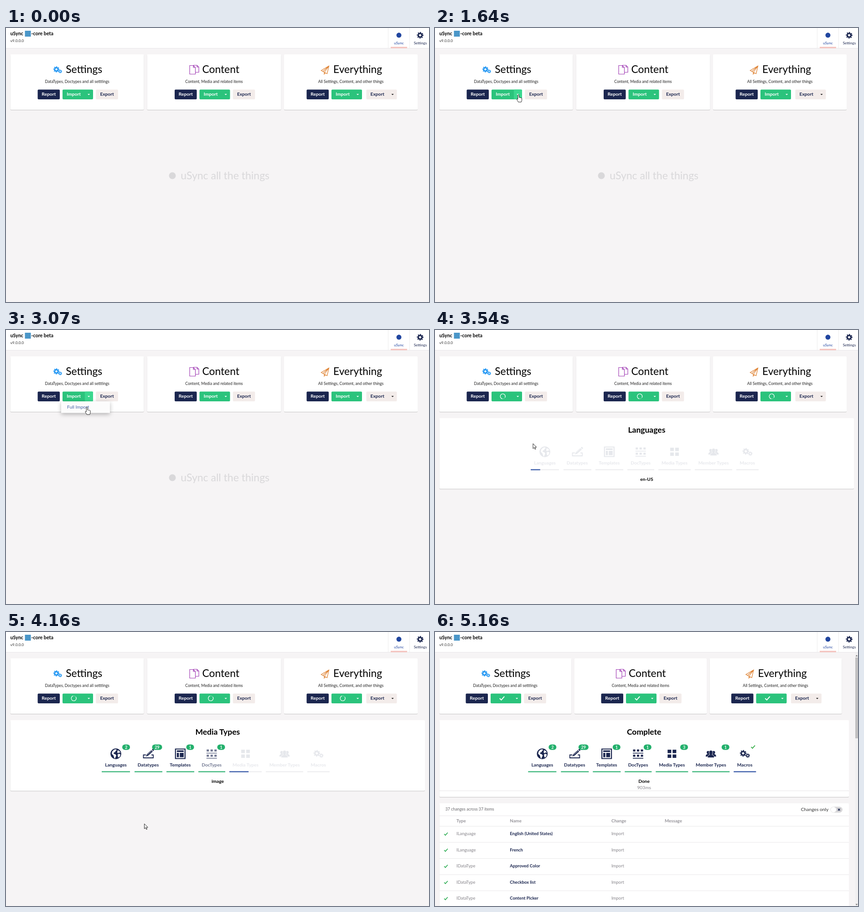
These frames come from a looping animation (928 px wide and 603 px high, 5.8 s). An HTML page:

```html
<!DOCTYPE html>
<html lang="en">
<head>
<meta charset="utf-8">
<title>uSync import</title>
<style>
  html, body { margin: 0; width: 100%; height: 100%; overflow: hidden; background: #f6f4f5; }
  svg { display: block; width: 100vw; height: 100vh; font-family: Lato, "Open Sans", sans-serif; }
  .panel { fill: #fff; filter: drop-shadow(0 1px .6px rgba(0, 0, 0, .2)); }
  .menu { fill: #fcfcfc; filter: drop-shadow(0 3px 5px rgba(0, 0, 0, .28)); }
</style>
</head>
<body>
<svg id="stage" viewBox="0 0 928 603"></svg>
<script>
const LOOP = 5800;
const NAVY = '#1b264f', GREEN = '#2bc37c', LIT = '#3bd78f', DONE = '#23b06c', BLUE = '#2146a0', GREY = '#86848a';
const OPEN = 2670, RUN = 3380, FINISH = 4540;

// Bursts of change: first step, last step, count.
const bursts = [[480, 1020, 8], [1110, 1640, 8], [2050, 2600, 8], [2670, 3200, 8],
  [3380, 3920, 8], [4000, 4540, 8], [4620, 4700, 2], [4860, 5160, 5]];
const steps = [0, ...bursts.flatMap(([a, b, n]) =>
  Array.from({ length: n }, (_, i) => Math.floor((a + (b - a) * i / (n - 1)) / 10) * 10))];

// Pointer path: time, x, y.
const path = [[480, 764, 262], [560, 700, 248], [710, 420, 197], [870, 200, 160], [940, 98, 142],
  [1020, 150, 149], [1110, 175.5, 150], [1330, 181, 150], [1640, 183, 147], [2120, 182.5, 145.5],
  [2670, 182.5, 147], [2900, 180, 164], [3040, 177.5, 170], [3200, 176, 171], [3380, 178, 175],
  [3530, 215, 250], [3760, 294.5, 374.5], [3920, 303.5, 422], [4780, 303.5, 422],
  [4930, 340, 462], [5080, 443, 561]];

const clamp = v => Math.max(0, Math.min(1, v));
const text = (x, y, size, s, fill = '#000', bold, anchor = 'start') =>
  `<text x="${x}" y="${y}" font-size="${size}" fill="${fill}" text-anchor="${anchor}"${bold ? ' font-weight="700"' : ''}>${s}</text>`;
const mid = (x, y, size, s, fill, bold) => text(x, y, size, s, fill, bold, 'middle');
const rect = (x, y, w, h, fill, rx = 0) => `<rect x="${x}" y="${y}" width="${w}" height="${h}" rx="${rx}" fill="${fill}"/>`;
const panel = (x, y, w, h) => `<rect class="panel" x="${x}" y="${y}" width="${w}" height="${h}" rx="2"/>`;
const line = (d, color, w = 1) => `<path d="${d}" fill="none" stroke="${color}" stroke-width="${w}"/>`;
const at = (x, y, s, extra = '') => `<g transform="translate(${x} ${y})" ${extra}>${s}</g>`;
const caret = (x, color) => `<path d="M${x - 2.6} 145h5.2l-2.6 2.8z" fill="${color}"/>`;
const tick = (x, y, size, color, w) =>
  line(`M${x - size} ${y}l${size * .7} ${size * .7}L${x + size} ${y - size * .8}`, color, w);

function gear(x, y, r, color) {
  const tooth = 2 * Math.PI * r * .87 / 16;
  return `<g fill="none" stroke="${color}" transform="translate(${x} ${y}) rotate(-11)">
    <circle r="${r * .56}" stroke-width="${r * .42}"/>
    <circle r="${r * .87}" stroke-width="${r * .28}" stroke-dasharray="${tooth}"/></g>`;
}

const pages = line('M411.5 83v-1h7.5l4 4v11.500h-7M419 82v4h4M403 82.500h8l4.500 4.500v14.500h-12.500zM411 82.500v4.500h4.500', '#a03cb4', 1.2);
const plane = line('M691.500 93.500L708.500 83.500L704.500 100.500L698.500 97.500zM708.500 83.500L698.500 97.500L698 101.500L701 98.700M708.500 83.500L695.500 95.500', '#de8030', 1.2);

const icons = [
  `<circle r="11.800" fill="${NAVY}"/><path fill="#fff" d="M-8-5l4-4 4-1 2 2-3 2 0 2-3 1-1 3 4 1 2 3-2 4-1 3-2-3-1-4-4-4zM4-8l4 2 2 4-3-1-2 2-2-2zM4 1l4-1 2 2-2 5-3 1-1-4z"/>`,
  line('M-5 2.500h-5.500v6.500h21.500v-6.500h-4', NAVY, 1.8) +
    `<path fill="${NAVY}" d="M-5 6l2-5L7-8l3 3L0 4zM8-9l2-2 3 3-2 2z"/>` + line('M-2 2L7.500-6', '#fff', .8),
  line('M-10.500-10.500h21v21h-21z', NAVY, 2.2) + rect(-7.500, -7.500, 15, 3.500, NAVY) +
    rect(-7.500, -2, 4.500, 9.500, NAVY) + rect(-1, -2, 8.500, 9.500, NAVY),
  [-9.500, 2].map(y => [-11, -2.500, 6].map(x => rect(x, y, 5, 4.500, NAVY)).join('')).join('') +
    rect(-11.500, -2.200, 23, 1.600, NAVY) + rect(-11.500, 9, 23, 1.600, NAVY),
  [-9, 1.500].map(y => [-9.500, 1.500].map(x => rect(x, y, 8, 7.500, NAVY)).join('')).join(''),
  `<g fill="${NAVY}"><circle cx="-6" cy="-3" r="3.200"/><circle cx="6" cy="-3" r="3.200"/>
    <path d="M-11.500 6q0-5 5.500-6h12q5.500 1 5.500 6z"/>
    <path stroke="#fff" stroke-width=".8" d="M-7.500 8.500q0-5 5-6.500-1.500-2-1.500-5 0-4.500 4-4.500t4 4.500q0 3-1.500 5 5 1.500 5 6.500z"/></g>`,
  gear(-3.500, -1, 7.200, NAVY) + gear(6.500, 4, 4.600, NAVY)
];

// Label, centre, bar ends, badge, badge centre, time done, message.
const tabs = [
  ['Languages', 241, 210, 272, 2, 263.5, 3660, 'en-US'],
  ['Datatypes', 312, 282, 343, 29, 331.5, 3720, 'Dropdown'],
  ['Templates', 382.3, 352, 413, 1, 404, 3840, 'simpledoctype'],
  ['DocTypes', 451.2, 422, 481, 1, 472, 3980, 'simpledoctype'],
  ['Media Types', 525.5, 490, 561, 3, 552.2, 4230, 'image'],
  ['Member Types', 611, 570, 652, 1, 643, 4310, 'member'],
  ['Macros', 685.3, 661, 710, 0, 703.5, 4390, 'macros']
];

function header() {
  return rect(0, 0, 928, 44, '#fff') + rect(0, 44, 928, 1, '#e9e7e9') +
    rect(838, 0, 1, 44, '#eeecee') + rect(885, 0, 1, 44, '#eeecee') +
    text(9.5, 16.2, 10.7, 'uSync', '#000', true) + rect(41.5, 6, 13, 13, '#4a96c8') +
    text(55.5, 16.2, 10.7, '-core beta', '#000', true) + text(9.5, 31, 8.4, 'v9.0.0.0', '#333') +
    `<circle cx="862" cy="15.800" r="5.500" fill="${BLUE}"/>` + mid(862, 36, 8.2, 'uSync', BLUE) +
    rect(844, 41.5, 36, 3, '#f5c1bc') + gear(908.6, 16, 7.2, NAVY) + mid(909, 36, 8.2, 'Settings', NAVY);
}

const cards = [
  { x: 9.5, w: 293, titleX: 131.3, title: 'Settings', note: 'DataTypes, Doctypes and all setttings', left: 69.5, shift: -2,
    icon: gear(110.5, 91, 6.6, '#2196f3') + gear(118.8, 95.5, 4, '#2196f3') },
  { x: 309.5, w: 294, titleX: 430.5, title: 'Content', note: 'Content, Media and related items', left: 370, shift: -5.5, icon: pages },
  { x: 610, w: 293, titleX: 718, title: 'Everything', note: 'All Settings, Content, and other things', left: 659.5, shift: -9.5, icon: plane }
];

function importButton(x, t, first) {
  const litMain = first && t >= 1110 && t < 1180, litCaret = first && t >= 1180 && t < RUN;
  let face;
  if (t < RUN) face = mid(x + 24.7, 149.2, 10.2, 'Import', '#fff', true);
  else if (t < FINISH) face = at(x + 24.7, 146, `<circle r="5.500" fill="none" stroke="#fff" stroke-opacity=".35"/>
    <circle r="5.500" fill="none" stroke="#fff" stroke-width="1.200" stroke-dasharray="27 7.560" transform="rotate(${t * .36 - 90})"/>`);
  else face = `<g opacity="${clamp(.4 + (t - FINISH) / 250)}">${tick(x + 25, 146, 5.2, '#fff', 2)}</g>`;
  return rect(x, 135.5, 67, 21.5, GREEN, 2) +
    (litMain ? rect(x, 135.5, 49, 21.5, LIT, 2) : '') +
    (litCaret ? rect(x + 49, 135.5, 18, 21.5, LIT, 2) : '') + face + caret(x + 57.6, '#fff');
}

function card(c, i, t) {
  const done = t >= FINISH, b = c.left, all = i === 2;
  const exportX = b + (all ? 131 : 127.8);
  const box = done ? panel([9.5, 306, 602.5][i], 58, 290, 122) : panel(c.x, 58, c.w, 122);
  return box + at(done ? c.shift : 0, 0,
    c.icon + text(c.titleX, 98.6, 22.8, c.title) +
    mid([156.2, 456.4, 756.6][i], 121.3, 8.67, c.note, '#222') +
    rect(b, 135.5, 48.5, 21.5, NAVY, 2) + mid(b + 24.3, 149.2, 10.2, 'Report', '#fff', true) +
    importButton(b + 54.5, t, i === 0) +
    rect(exportX, 135.5, all ? 67 : 48.5, 21.5, '#f3ecea', 2) +
    mid(exportX + 24.3, 149.2, 10.2, 'Export', NAVY, true) + (all ? caret(exportX + 57.6, '#222') : ''));
}

function tab([label, cx, x0, x1, count, bx, done], i, t) {
  const from = i ? tabs[i - 1][6] : RUN, isDone = t >= done, last = i === 6;
  const part = isDone ? 1 : clamp(((t - from) / (done - from) - .35) * 1.8);
  let badge = '';
  if (isDone && count) {
    const w = count > 9 ? 22 : 17;
    badge = rect(bx - w / 2, 247.5, w, 12, DONE, 6) + mid(bx, 256.6, 9, count, '#fff', true);
  } else if (last && t >= FINISH) badge = tick(bx, 253, 4.2, '#3aae4c', 1.8);
  return `<g opacity="${clamp(.1 + Math.max(0, t - done) * .003)}">` +
    at(cx, 268, icons[i]) + mid(cx, 296.2, 10.2, label, NAVY, true) + '</g>' +
    rect(x0, 306.5, x1 - x0, 2, '#ebebee') +
    rect(x0, 306.5, (x1 - x0) * part, 2, isDone && !last ? DONE : BLUE) + badge;
}

function progress(t) {
  const done = t >= FINISH, now = tabs.find(d => t < d[6]) || tabs[6];
  return (done ? panel(9.5, 194, 898.5, 169) + rect(9.5, 349, 898.5, 1, '#e6e4e6') : panel(9.5, 194, 909.5, 155.5)) +
    at(done ? -5.7 : 0, 0,
      mid(464.4, 226, 17.5, done ? 'Complete' : now[0], '#000', true) +
      tabs.map((d, i) => tab(d, i, t)).join('') +
      mid(464.4, 332, 10.2, done ? 'Done' : now[7], '#000', true) +
      (done ? mid(464.4, 346, 10.2, '903ms', GREY) : ''));
}

function results() {
  const rows = [['ILanguage', 'English (United States)'], ['ILanguage', 'French'], ['IDataType', 'Approved Color'],
    ['IDataType', 'Checkbox list'], ['IDataType', 'Content Picker']];
  const heads = [[47, 'Type'], [164.3, 'Name'], [387, 'Change'], [504, 'Message']];
  const rule = y => rect(9.5, y, 898.5, 1, '#eae8ea');
  return panel(9.5, 377, 898.5, 230) +
    text(22.7, 393.4, 8.9, '37 changes across 37 items', '#68676b') +
    text(802.7, 394.2, 10.3, 'Changes only', '#333') +
    rect(867.5, 384.5, 26.5, 13, '#d8d7d9', 6.5) + '<circle cx="874.200" cy="391" r="6" fill="#fff"/>' +
    line('M884 388.700l4.600 4.600m0-4.600l-4.600 4.600', NAVY, 1.5) +
    rule(404) + heads.map(([x, s]) => text(x, 418.6, 9.7, s, '#96949a', true)).join('') +
    rows.map(([type, name], i) => {
      const y = 447.4 + i * 35.5;
      return rule(y - 20.4) + tick(24, y - 2.8, 3.8, '#2fae55', 1.7) + text(47, y, 9.5, type, GREY) +
        text(164.3, y, 9.45, name, NAVY, true) + text(387, y, 9.45, 'Import', GREY);
    }).join('') +
    rect(922, 45, 6, 558, '#f1f0f1') + rect(922, 56, 6, 178, '#c1c0c1') +
    '<path d="M922.500 53.500h5l-2.500-3zM922.500 598.500h5l-2.500 3z" fill="#777"/>';
}

function menu(t) {
  const hover = t >= 2900;
  return '<rect class="menu" x="121" y="157" width="107" height="25.500"/>' +
    text(134, 173.2, 10.2, 'Full Import', hover ? '#4563a8' : NAVY);
}

function pointer(t) {
  if (t < 480 || t >= 5150) return '';
  const n = path.findIndex(p => p[0] > t);
  const [t0, x0, y0] = path[n < 0 ? path.length - 1 : n - 1];
  const [t1, x1, y1] = n < 0 ? [t0 + 1, x0, y0] : path[n];
  const k = clamp((t - t0) / (t1 - t0));
  const hand = t >= 930 && t < RUN;
  const d = hand
    ? 'M-1.300 10V1.200a1.300 1.300 0 0 1 2.600 0V6q1.300-.8 2.400.4 1.400-.7 2.400.5 1.400-.3 1.400 1.600V12.500L6.200 16H-.2L-3.700 10.300Q-3.500 8-1.300 10Z'
    : 'M0 0V11L2.600 8.600 4.400 12.600 6 11.900 4.300 8H7.800Z';
  return at(x0 + (x1 - x0) * k, y0 + (y1 - y0) * k, `<path d="${d}" fill="#fff" stroke="#111" stroke-width=".9"/>`);
}

function scene(t) {
  return header() + cards.map((c, i) => card(c, i, t)).join('') +
    (t < RUN ? '<circle cx="365" cy="325" r="7.500" fill="#d9d8da"/>' + text(383.3, 332.6, 23, 'uSync all the things', '#d9d8da') : progress(t)) +
    (t >= FINISH ? results() : '') + (t >= OPEN && t < RUN ? menu(t) : '') + pointer(t);
}

const stage = document.getElementById('stage'), start = performance.now();
let shown = -1;

function tickFrame() {
  const t = (performance.now() - start) % LOOP;
  const step = steps.filter(s => s <= t).pop();
  if (step !== shown) {
    stage.innerHTML = scene(step);
    shown = step;
  }
  requestAnimationFrame(tickFrame);
}
tickFrame();
</script>
</body>
</html>
```
